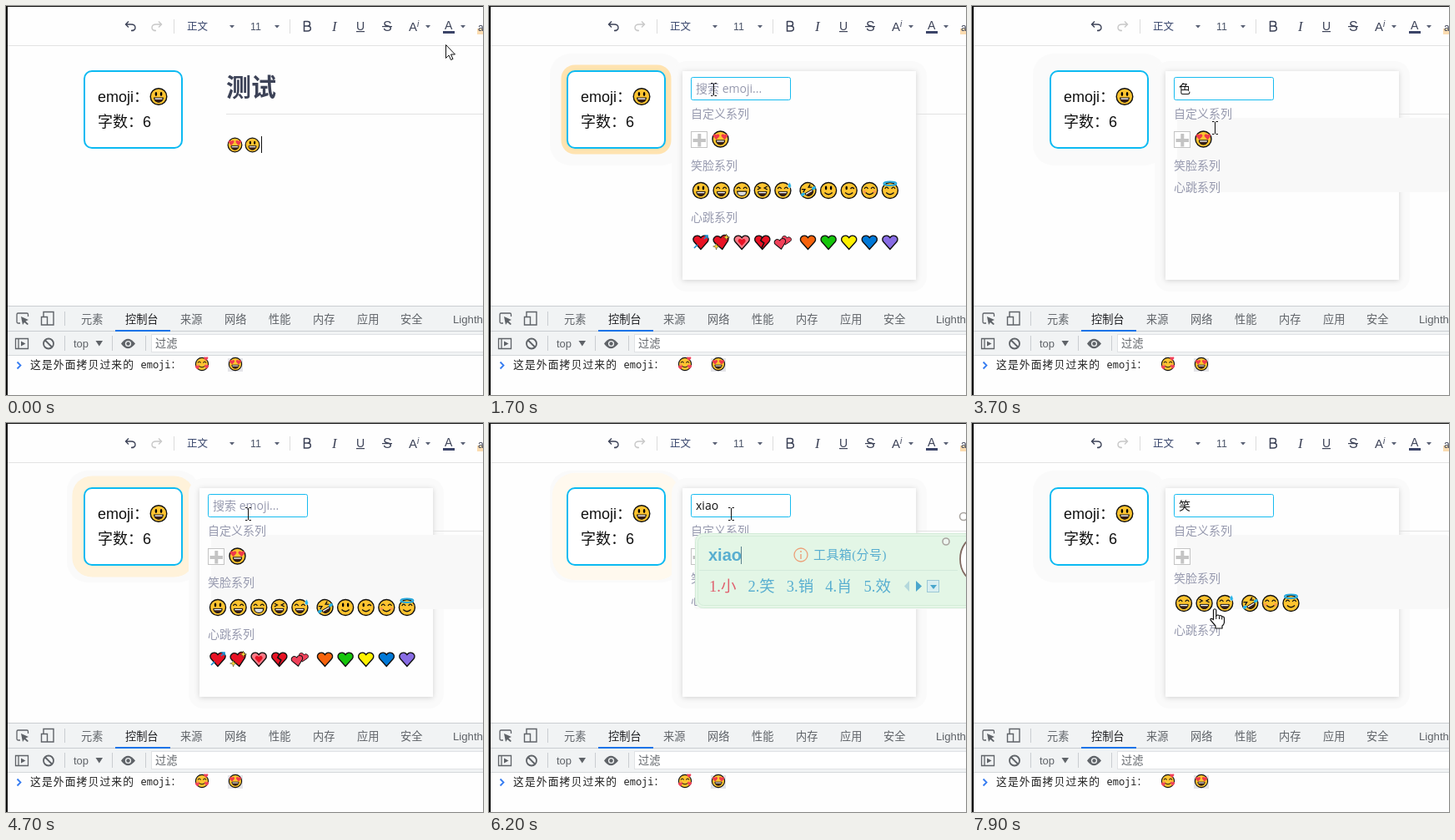
An HTML page for the animation above (8000 ms loop, 572 px wide and 466 px high).

```html
<!DOCTYPE html>
<html lang="zh">
<head>
<meta charset="utf-8">
<style>
html, body { margin: 0; width: 100%; height: 100%; overflow: hidden; background: #fff; }
svg { display: block; width: 572px; height: 466px; }
text { font-family: "Liberation Sans", "Noto Sans CJK SC", "Noto Sans CJK", sans-serif; white-space: pre; }
.field { font-family: "Open Sans", "Noto Sans CJK SC", sans-serif; }
.mono { font-family: "Noto Sans Mono", "Noto Sans CJK SC", monospace; }
.serif { font-family: "Liberation Serif", "Noto Sans CJK SC", serif; }
.light { font-weight: 300; }
#panel { filter: drop-shadow(0 1px 3px rgba(0, 0, 0, .16)); }
</style>
</head>
<body>
<svg id="stage" viewBox="0 0 572 466"></svg>
<script>
const LOOP = 8000, STEP = 100;
const PULSE = { start: 65, period: LOOP / 6, active: 933, spread: 20 };

// Shape helpers
const text = (x, y, s, size = 14, fill = '#222', more = '') =>
  `<text x="${x}" y="${y}" font-size="${size}" fill="${fill}" ${more}>${s}</text>`;
const rect = (x, y, w, h, fill, more = '') =>
  `<rect x="${x}" y="${y}" width="${w}" height="${h}" fill="${fill}" ${more}/>`;
const path = (d, stroke = '#111', width = 1.4, fill = 'none', more = '') =>
  `<path d="${d}" fill="${fill}" stroke="${stroke}" stroke-width="${width}" ${more}/>`;
const circle = (x, y, r, fill, more = '') =>
  `<circle cx="${x}" cy="${y}" r="${r}" fill="${fill}" ${more}/>`;
const at = (x, y, body, scale = 1, turn = 0) =>
  `<g transform="translate(${x} ${y}) rotate(${turn}) scale(${scale})">${body}</g>`;
const mirror = body => body + `<g transform="scale(-1 1)">${body}</g>`;

// Emoji parts, drawn around 0,0 with a radius of ten
const HEART = 'M0 8.5L-8 -.5C-12 -6 -4 -11 0 -5.5C4 -11 12 -6 8 -.5Z';
const heart = (fill, x = 0, y = 0, scale = 1, turn = 0) =>
  at(x, y, path(HEART, '#111', 1.4, fill), scale, turn);
const plainHeart = (fill, x, y, scale) => at(x, y, path(HEART, 'none', 0, fill), scale);
const dots = mirror('<ellipse cx="3" cy="-3" rx="1.25" ry="2.4"/>');
const arcs = mirror(path('M1.8 -2Q4 -5.6 6.2 -2', '#111', 1.3));
const squint = mirror(path('M6 -5L2.4 -3L6 -1', '#111', 1.3));
const heartEyes = mirror(plainHeart('#f03a4a', 4.9, -2.8, .42));
const grin = path('M-5.2 1.4H5.2C5.2 8.2 -5.2 8.2 -5.2 1.4Z', '#111', 1, '#3a2018') +
  rect(-4.3, 1.9, 8.6, 1.3, '#fff');
const teeth = path('M-5.5 1.2H5.5C5.5 8 -5.5 8 -5.5 1.2Z', '#111', 1.2, '#fff') + path('M-4.8 3.8H4.8', '#999', .7);
const smile = path('M-4.6 2.5Q0 7 4.6 2.5', '#111', 1.3);
const cheeks = mirror(circle(6, 1.6, 1.8, '#ff9a4c'));
const drop = path('M8 -10Q12 -4 8 -3Q4 -4 8 -10Z', '#fff', .5, '#28b4e8');
const tears = mirror('<ellipse cx="7.5" cy="1" rx="2.6" ry="1.8" fill="#28b4e8"/>');
const ring = '<ellipse cy="-8.3" rx="7.5" ry="2.2" fill="none" stroke="#25a8dc" stroke-width="2"/>';
const loveBits = plainHeart('#f0415a', -7, 5, .36) + plainHeart('#f0415a', 7, 4, .36) + plainHeart('#f0415a', 6, -8, .36);

const FACES = {
  open: dots + grin,
  happy: arcs + grin,
  beam: arcs + teeth,
  laugh: squint + grin,
  sweat: arcs + grin + drop,
  rofl: squint + grin + tears,
  slight: dots + smile,
  wink: '<ellipse cx="-3" cy="-3" rx="1.25" ry="2.2"/>' + path('M1.8 -2Q4 -5 6.2 -2', '#111', 1.3) + smile,
  blush: cheeks + arcs + smile,
  angel: arcs + smile + ring,
  love: heartEyes + grin,
  adore: cheeks + arcs + smile + loveBits
};
const face = (kind, x, y, scale = 1) => at(x, y,
  circle(0, 0, 9.5, '#ffc430', 'stroke="#111" stroke-width="1.4"') + FACES[kind],
  scale, kind === 'rofl' ? -30 : 0);

const RED = '#e81224';
const spark = (x, y) => at(x, y, path('M0 -4L1 -1L4 0L1 1L0 4L-1 1L-4 0L-1 -1Z', '#111', .4, '#ffd83a'));
const HEARTS = [
  heart(RED) + path('M-8 7L-4 3M4 -4L8 -8M4.5 -8H8V-4.5', '#1a8fd0', 1.7),
  heart(RED, 0, 0, 1, -8) + spark(-6, 5) + spark(6, -6),
  heart('#f77a86') + plainHeart(RED, 0, 0, .5),
  heart(RED) + path('M0 -6L-2 -2L2 1L-1 7', '#111', 1.6),
  heart('#f0415a', 4, -2, .62, 15) + heart('#f0415a', -3, 2, .75, -10),
  ...['#f7630c', '#16c60c', '#fff100', '#0078d7', '#886ce4'].map(c => heart(c))
];
const SMILES = ['open', 'happy', 'beam', 'laugh', 'sweat', 'rofl', 'slight', 'wink', 'blush', 'angel'];
const FOUND = ['happy', 'laugh', 'sweat', 'rofl', 'blush', 'angel'];
const slot = (i, wide) => 254 + 24.6 * i + (i > wide ? 5.5 : 0);

// Fixed page parts
const INK = '#3c4257', GREY = '#5f6368';
const caretDown = (x, y = 24) => path(`M${x - 3} ${y - 1}h6l-3 3.5z`, 'none', 0, '#596074');
const bar = (x, y, h, c = '#dcdcdc') => rect(x, y, 1, h, c);

function toolbar() {
  const undo = c => path('M4 5.5H1Q6 5.5 6 2Q6 -2 1 -2H-5M-2 -5.5L-5.5 -2L-2 1.5', c, 1.4);
  return rect(0, 47, 572, 1, '#e3e3e3') + at(149, 24, undo(INK)) +
    `<g transform="translate(181 24) scale(-1 1)">${undo('#c8c8c8')}</g>` +
    bar(201, 16, 17) + text(217, 29, '正文', 12.5, '#35436a') + caretDown(271) +
    text(293, 29, '11', 12.5, '#4a5368') + caretDown(325) + bar(340, 16, 17) +
    path('M357.5 18.5H361.5Q364.5 18.5 364.5 21.2Q364.5 24 361.5 24H357.5M361.5 24Q365.3 24 365.3 27Q365.3 30 361.5 30H357.5V18', INK, 1.5) +
    text(391, 30, 'I', 17, INK, 'class="serif" font-style="italic"') +
    text(420, 29, 'U', 14, INK) + rect(420, 30, 10, 1.2, INK) +
    text(452, 30, 'S', 16, INK) + rect(451, 24, 12, 1.2, INK) +
    text(483, 30, 'A', 15, INK) + text(493, 25, 'i', 10, INK, 'font-style="italic"') + caretDown(506) +
    text(526, 28, 'A', 14, INK) + rect(524, 30, 14, 3, '#3b4468') + caretDown(548) +
    rect(565, 27, 7, 7, '#fbdcb0') + text(566, 30, 'a', 12, INK);
}

function editor() {
  return text(264, 108, '测试', 30, INK, 'font-weight="bold"') + rect(264, 129, 308, 1, '#e2e2e2') +
    face('love', 274.5, 166.5, .88) + face('open', 295.5, 166.5, .88);
}

function card() {
  return rect(94, 78, 117, 92, '#fff', 'rx="9" stroke="#0cbaf2" stroke-width="2"') +
    text(110, 115, 'emoji：', 18, '#111') + face('open', 183, 108.5, 1.03) +
    text(110, 145, '字数：6', 18, '#111');
}

function devtools() {
  const tabs = [['元素', 90], ['控制台', 143], ['来源', 209], ['网络', 262], ['性能', 315],
    ['内存', 368], ['应用', 421], ['安全', 473], ['Lighthouse', 536]];
  const inspect = path('M17 380H14.5Q13 380 13 378.5V369.5Q13 368 14.5 368H25Q26.5 368 26.5 369.5V372', GREY, 1.3) +
    path('M18 372L27 376L23.5 377.5L27 381L25.5 382L22 379L20 382Z', 'none', 0, GREY);
  const devices = path('M45 372V366.5H57V382H50M42.5 372.5H49.5V382H42.5Z', GREY, 1.4);
  const sidebar = path('M11.5 398.5H26.5V410.5H11.5ZM15 398.5V410.5', GREY, 1.3) +
    path('M18 401.5L23.5 404.5L18 407.5Z', 'none', 0, GREY);
  const clear = circle(51, 404.5, 6, 'none', `stroke="${GREY}" stroke-width="1.8"`) + path('M47 400.5L55 408.5', GREY, 1.8);
  const eye = path('M138 404.5Q146 393 155 404.5Q146 416 138 404.5Z', 'none', 0, GREY) +
    circle(146.5, 404.5, 3.6, '#f1f3f4') + circle(146.5, 404.5, 2.2, GREY);
  return rect(0, 360, 572, 58, '#f1f3f4') + rect(0, 359, 572, 1, '#cacdd1') +
    rect(0, 389, 572, 1, '#cacdd1') + rect(0, 418, 572, 1, '#d5d8db') + rect(131, 388, 66, 2, '#1a73e8') +
    inspect + devices + bar(70, 366, 17, '#cacdd1') +
    tabs.map(([s, x], i) => text(x, 380, s, 13.2, i === 1 ? '#202124' : GREY)).join('') +
    sidebar + clear + bar(70, 395, 18, '#cacdd1') + text(81, 409, 'top', 13, GREY) +
    path('M107.5 401H116L111.8 407.5Z', 'none', 0, GREY) + bar(127, 395, 18, '#cacdd1') + eye +
    bar(167, 395, 18, '#cacdd1') + rect(174.5, 393.5, 400, 21, '#fff', 'stroke="#e0e2e5"') +
    text(179, 409, '过滤', 13.2, GREY) +
    path('M13.5 426.5L17.5 430.5L13.5 434.5', '#367cf1', 1.8) +
    text(29, 434, '这是外面拷贝过来的', 12.8, '#222', 'letter-spacing="1.1"') +
    text(161.5, 434, 'emoji：', 12, '#222', 'class="mono"') +
    face('adore', 235, 429, .8) + rect(266, 422, 18, 16, '#e4e4e8') + face('love', 275, 429, .8);
}

// Emoji picker for a given query
function picker(query) {
  const all = query === '', label = '#9699ae';
  const custom = all || query === '色';
  const row = all ? SMILES : query === '笑' ? FOUND : [];
  const y2 = custom ? 191 : 186, y3 = y2 + (row.length ? 62 : 26);
  return rect(242.5, 85.5, 119, 27, '#fff', 'rx="2" stroke="#16bbf0"') +
    text(248, 104, all ? '搜索 emoji...' : query, 14, all ? label : '#111', 'class="field"') +
    text(242, 134, '自定义系列', 14, label) +
    rect(242.5, 150.5, 19, 19, '#fff', 'stroke="#c4c4c4"') + path('M244.5 161H260M252.3 153V168.5', '#c4c4c4', 4) +
    (custom ? face('love', 277.5, 159.5) : '') +
    text(242, y2 + 5, '笑脸系列', 14, label) +
    row.map((f, i) => face(f, slot(i, all ? 4 : 2), y2 + 30)).join('') +
    text(242, y3 + 5, '心跳系列', 14, label) +
    (all ? HEARTS.map((h, i) => at(slot(i, 4), y3 + 30, h)).join('') : '');
}

// Input method window
function ime(typed, words) {
  const blue = '#58aed0';
  const w = typed.length < 2 ? 10 : typed === 'se' ? 22 : [17, 27, 39][typed.length - 2];
  return rect(247.5, 132.5, 340, 89, '#e6f6e8', 'rx="9" stroke="#d3ecd8"') +
    rect(250.5, 135.5, 340, 83, '#e3f6e6', 'rx="7" stroke="#d3ecd8"') +
    rect(252, 176, 310, 1, '#d3eadb') +
    text(263, 165, typed, 20, blue, 'font-weight="bold"') + rect(263 + w, 148, 1, 21, '#58808c') +
    circle(374, 158, 8, 'none', 'stroke="#eca079" stroke-width="1.3"') + rect(373.3, 157, 1.4, 6, '#eca079') + circle(374, 154, 1, '#eca079') +
    text(389, 163, '工具箱(分号)', 15, blue, 'class="serif light" letter-spacing=".4"') +
    [...words].map((c, i) => text(264 + 46.4 * i, 202, `${i + 1}.${c}`, 18.5, i ? blue : '#e0606e', 'class="serif light"')).join('') +
    path('M504 189V202L498 195.5Z', 'none', 0, '#b4d8dc') + path('M512 189V202L519 195.5Z', 'none', 0, '#4aa6cc') +
    rect(525.5, 188.5, 14, 14, '#d8eef0', 'stroke="#9cc8d6"') + path('M529 194H537L533 199Z', 'none', 0, '#4aa6cc') +
    circle(548, 142, 4, '#eef6f0', 'stroke="#a9a5a0" stroke-width="1.6"') +
    circle(569, 112, 4.5, '#fff', 'stroke="#a9a5a0" stroke-width="1.6"') +
    '<ellipse cx="584" cy="163" rx="19" ry="26" fill="#fff" stroke="#806860" stroke-width="1.8"/>';
}

const POINTERS = {
  arrow: path('M.5 .5V16.5L4 13L6.5 18.5L9 17.5L6.5 12H11.5Z', '#111', 1, '#fff'),
  beam: path('M-3 -7.5H-.5M1.5 -7.5H4M-3 7.5H-.5M1.5 7.5H4M.5 -7V7', '#111', 1),
  hand: path('M-1.5 1Q0 -1.5 1.8 1V8Q4 6 5.5 8Q8 7 8.7 9Q11.5 8.5 11.5 11V16Q11 19 9 20V23H1V20L-5 13Q-5.5 10 -1.5 12.5Z', '#111', 1.2, '#fff') +
    path('M1.8 8V12M5.5 8.5V12M8.7 9.5V12.5', '#111', 1)
};
const MOVES = [
  [0, 527, 46, 'arrow'], [100, 515, 50, 'arrow'], [400, 188, 118, 'hand'], [600, 184, 116, 'hand'],
  [700, 215, 110, 'arrow'], [800, 250, 102, 'beam'], [900, 267, 100, 'beam'], [1000, 269, 100, 'beam'],
  [3500, 269, 100, 'beam'], [3700, 291, 146, 'beam'], [3800, 284, 158, 'hand'], [4000, 284, 158, 'hand'],
  [4200, 290, 125, 'beam'], [4300, 290, 109, 'beam'], [7400, 290, 109, 'beam'], [7600, 311, 188, 'arrow'],
  [7700, 306, 210, 'hand'], [7800, 296, 220, 'hand'], [7900, 291, 223, 'hand'], [8000, 291, 223, 'hand']
];
// Start, query, candidate words, blink origin, caret x
const STAGES = [
  [0, null], [500, '', '', 1150, 248], [2100, 's', '是说上时三'], [2400, 'se', '色涩瑟塞社'],
  [2700, '色', '', 2700, 262], [4100, '', '', 4140, 248], [5500, 'x', '想下小新些'],
  [5700, 'xi', '系西洗戏喜'], [5900, 'xia', '下夏吓瞎虾'], [6100, 'xiao', '小笑销肖效'],
  [6300, '笑', '', 6300, 262]
];

const stage = document.getElementById('stage');
stage.innerHTML = rect(0, 0, 572, 466, '#fefefe') + toolbar() + editor() +
  `<g id="halo">${rect(73, 57, 159, 134, '#fafafa', 'rx="25"')}</g><rect id="pulse"/>${card()}` +
  rect(306, 156, 1, 20, '#111', 'id="editCaret"') +
  `<g id="popup">${rect(219, 66, 306, 276, '#fafafa', 'rx="18"')}${rect(232, 78, 280, 250, '#fefefe', 'id="panel"')}` +
  `${rect(512, 129, 60, 1, '#e2e2e2')}${rect(246, 134, 326, 89, '#f8f8f8', 'id="shade" rx="4"')}<g id="list"></g></g>` +
  rect(0, 91, 1, 16, '#111', 'id="caret"') + '<g id="ime"></g>' + devtools() +
  rect(0, 0, 2, 466, '#111') + rect(0, 0, 572, 1, '#111') + '<g id="pointer"></g>';

const $ = id => document.getElementById(id);
const set = (id, attrs) => { for (const k in attrs) $(id).setAttribute(k, attrs[k]); };
const show = (id, on) => set(id, { visibility: on ? 'visible' : 'hidden' });
let drawnStage, drawnPointer;

function drawPulse(t) {
  const age = (t - PULSE.start + LOOP) % PULSE.period, p = age / PULSE.active;
  show('pulse', p < 1);
  if (p >= 1) return;
  const s = PULSE.spread * p, tint = .46 * (1 - p);
  set('pulse', {
    x: 93 - s, y: 77 - s, width: 119 + 2 * s, height: 94 + 2 * s, rx: 10 + s,
    fill: `rgb(255,${255 - 90 * tint},${255 - 255 * tint})`
  });
}

function drawPointer(t) {
  const i = MOVES.findIndex((m, n) => n && t < m[0]) - 1;
  const [t0, x0, y0, kind] = MOVES[i], [t1, x1, y1] = MOVES[i + 1];
  const k = (t - t0) / (t1 - t0);
  if (kind !== drawnPointer) $('pointer').innerHTML = POINTERS[drawnPointer = kind];
  set('pointer', { transform: `translate(${Math.round(x0 + (x1 - x0) * k)} ${Math.round(y0 + (y1 - y0) * k)})` });
}

function draw(t) {
  const now = STAGES.filter(s => s[0] <= t).pop();
  const [, query, words, blink, caretX] = now, open = query !== null;
  if (now !== drawnStage) {
    drawnStage = now;
    set('popup', { display: open ? 'inline' : 'none' });
    $('list').innerHTML = open ? picker(query) : '';
    $('ime').innerHTML = words ? ime(query, words) : '';
  }
  set('shade', { display: t >= 2100 ? 'inline' : 'none' });
  show('halo', t >= 900);
  show('editCaret', !open);
  show('caret', caretX && t >= blink && (t - blink) % 1060 < 530);
  if (caretX) set('caret', { x: caretX });
  drawPulse(t);
  drawPointer(t);
}

const begin = performance.now();
function tick() {
  const t = (performance.now() - begin) % LOOP;
  draw(Math.floor(t / STEP) * STEP);
  requestAnimationFrame(tick);
}
tick();
</script>
</body>
</html>
```
